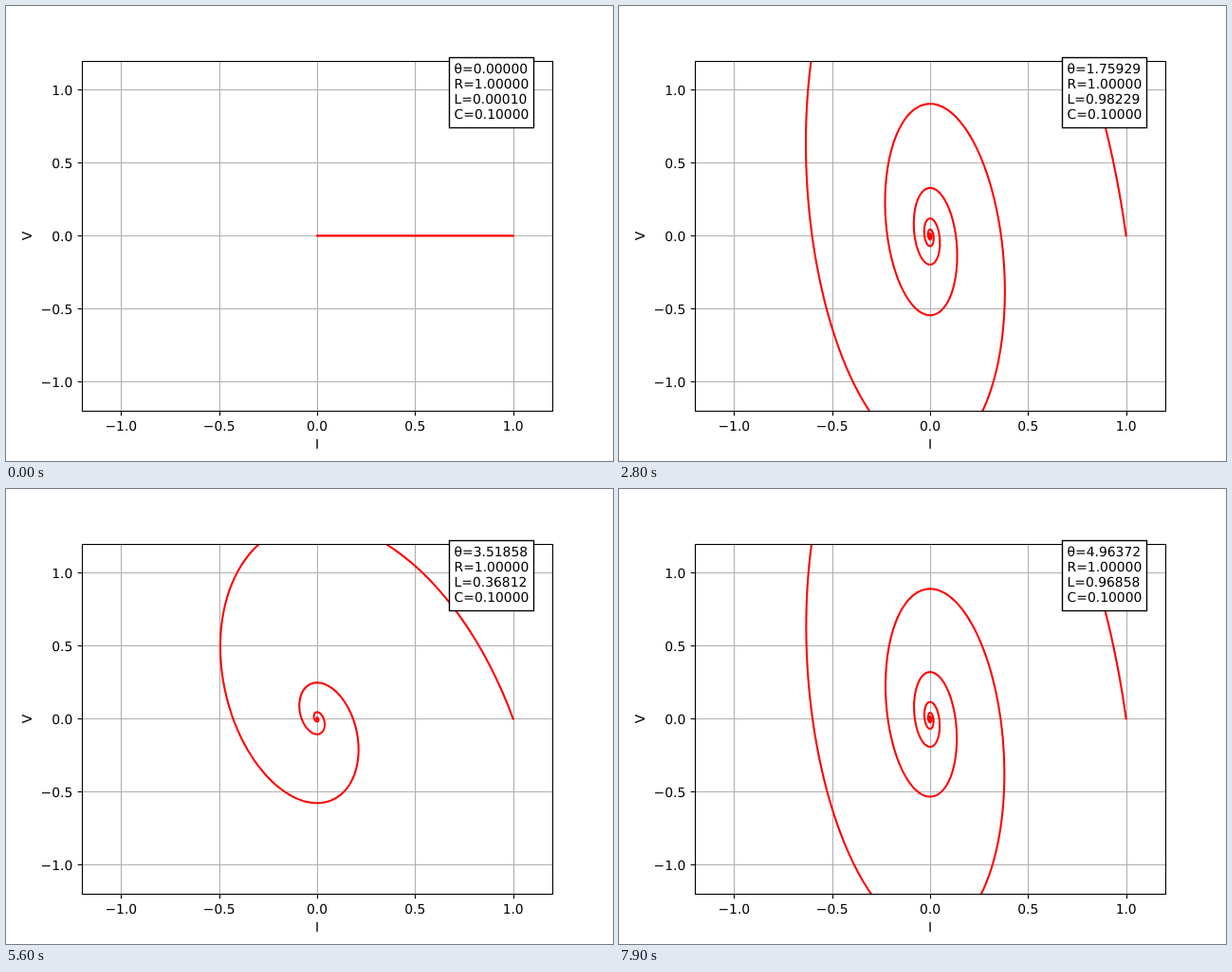
These frames come from a looping animation (640x480 px, 8000 ms). An HTML page:

```html
<!DOCTYPE html>
<html lang="en">
<head>
<meta charset="utf-8">
<title>RLC phase portrait</title>
<style>
  html, body { margin: 0; width: 100%; height: 100%; overflow: hidden; background: #fff; }
  svg { display: block; width: 640px; height: 480px; }
  text { font: 13.89px "DejaVu Sans", sans-serif; white-space: pre; text-rendering: geometricPrecision; }
  .mid { text-anchor: middle; }
  .end { text-anchor: end; }
  path, rect { fill: none; stroke: #000; stroke-width: 1.11; }
  #grid { stroke: #b0b0b0; }
  #curve { stroke: #f00; stroke-width: 2.08; stroke-linejoin: round; stroke-linecap: square; }
  #box { fill: #fff; stroke-width: 1.39; }
</style>
</head>
<body>
<svg viewBox="0 0 640 480">
  <clipPath id="area"><path d="M80 58H576V427H80Z"/></clipPath>
  <path id="grid"/>
  <path id="ticks"/>
  <g clip-path="url(#area)"><path id="curve"/></g>
  <rect x="80.5" y="58.5" width="496" height="369"/>
  <g id="labels"></g>
  <text class="mid" x="328" y="467">I</text>
  <text class="mid" transform="translate(27 242.5) rotate(-90)">V</text>
  <rect id="box" x="467.5" y="54.5" width="89" height="74"/>
  <g id="values"></g>
</svg>
<script>
const FRAME_MS = 100, FRAMES = 80;
const R = 1, C = 0.1;
const $ = id => document.getElementById(id);
const toX = i => 328 + i * 496 / 2.4;
const toY = v => 242.4 - v * 154;
const snap = p => Math.round(p) + 0.5;

function addText(parent, x, y, cls, content = "") {
  const el = document.createElementNS("http://www.w3.org/2000/svg", "text");
  el.setAttribute("x", x);
  el.setAttribute("y", y);
  el.setAttribute("class", cls);
  el.textContent = content;
  return parent.appendChild(el);
}

function drawAxes() {
  let grid = "", ticks = "";
  for (const n of [-1, -0.5, 0, 0.5, 1]) {
    const x = snap(toX(n)), y = snap(toY(n));
    grid += `M${x} 58V427M80 ${y}H576`;
    ticks += `M${x} 427.5v4.86M80.5 ${y}h-4.86`;
    const label = n.toFixed(1).replace("-", "\u2212");
    addText($("labels"), toX(n), 448, "mid", label);
    addText($("labels"), 70.3, Math.round(toY(n) + 5.28), "end", label);
  }
  $("grid").setAttribute("d", grid);
  $("ticks").setAttribute("d", ticks);
}

// Free response of a series RLC circuit from I = 1, V = 0.
function state(L, t) {
  const a = R / (2 * L);
  const disc = a * a - 1 / (L * C);
  const w = Math.sqrt(Math.abs(disc));
  if (disc > 0) {
    const s1 = w - a, s2 = -w - a;
    const e1 = Math.exp(s1 * t), e2 = Math.exp(s2 * t);
    return [(s1 * e1 - s2 * e2) / (2 * w), (e1 - e2) / (2 * w * C)];
  }
  const e = Math.exp(-a * t), s = Math.sin(w * t) / w;
  return [e * (Math.cos(w * t) - a * s), e * s / C];
}

function spiral(L) {
  const points = [];
  for (let k = 0; k <= 1500; k++) {
    const [i, v] = state(L, k * 0.01);
    points.push(toX(i).toFixed(2) + " " + toY(v).toFixed(2));
  }
  return "M" + points.join("L");
}

drawAxes();
const lines = [71, 87, 103, 119].map(y => addText($("values"), 472.6, y, ""));
let shown = -1;

function render(now) {
  const step = Math.floor(now / FRAME_MS) % FRAMES;
  if (step !== shown) {
    shown = step;
    const theta = step * Math.PI / 50;
    const L = Math.max(Math.abs(Math.sin(theta)), 1e-4);
    $("curve").setAttribute("d", spiral(L));
    Object.entries({ "θ": theta, R, L, C }).forEach(([name, value], k) => {
      lines[k].textContent = `${name}=${value.toFixed(5)}`;
    });
  }
}

const start = performance.now();
function loop() {
  render(performance.now() - start);
  requestAnimationFrame(loop);
}
loop();
</script>
</body>
</html>
```
